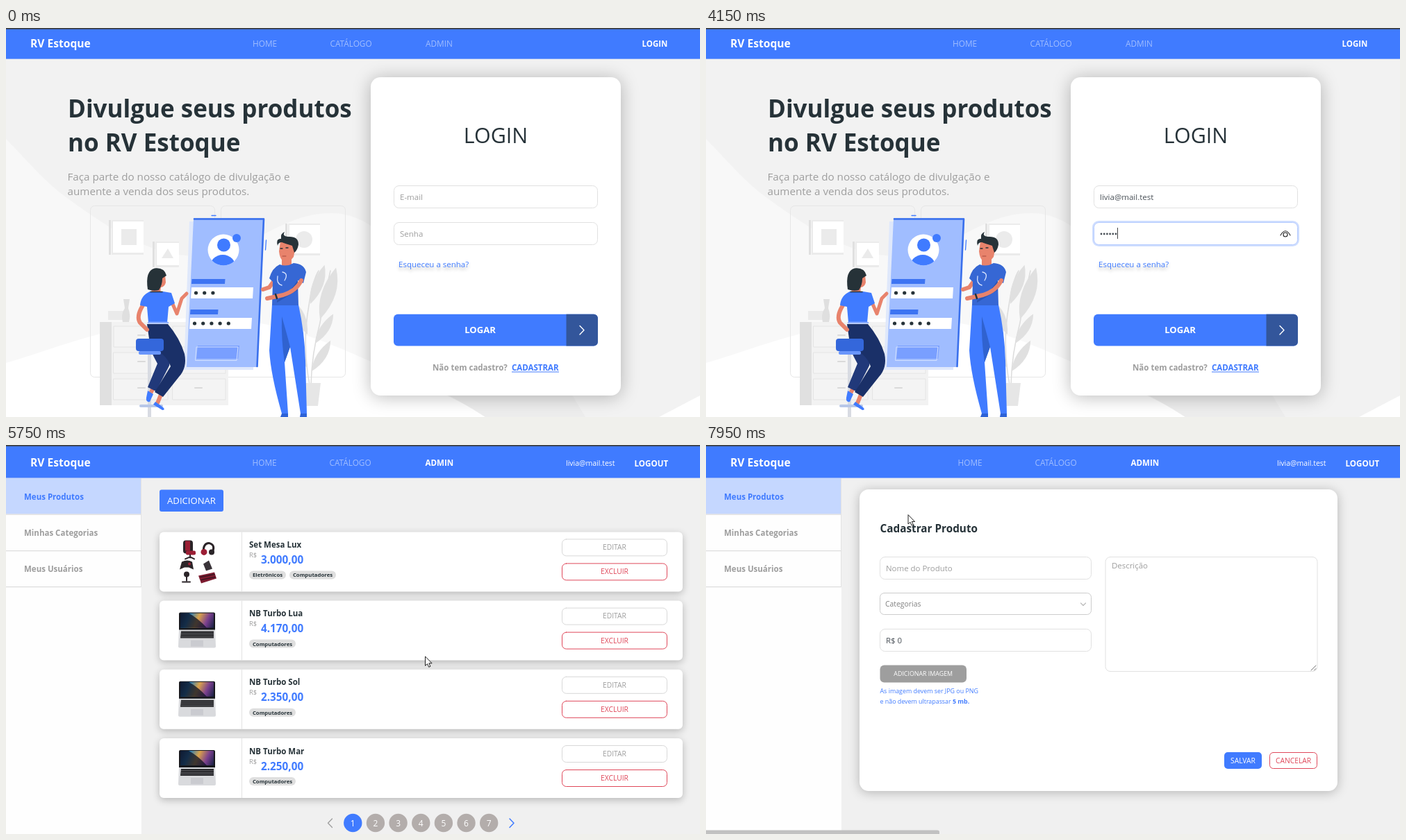
Animation, 999 px wide and 561 px high, one loop 8000 ms. Source, as an HTML page with a canvas:

```html
<!DOCTYPE html>
<html lang="pt-BR">
<head>
<meta charset="utf-8">
<title>Painel de produtos</title>
<style>
html, body { margin: 0; width: 100%; height: 100%; overflow: hidden; background: #f2f2f2; }
canvas { display: block; width: 999px; height: 561px; }
</style>
</head>
<body>
<canvas id="stage" width="999" height="561"></canvas>
<script>
const ctx = document.getElementById('stage').getContext('2d');
const LOOP = 8000;
const BRAND = 'RV Estoque';
const EMAIL = 'livia@mail.test';
const BLUE = '#407bff', INK = '#263238', GRAY = '#9e9e9e', RED = '#df4759';
const LINE = '#e1e1e1', BG = '#f2f2f2', SKIN = '#e8836c', NAVY = '#1a3068';

const clamp = v => Math.max(0, Math.min(1, v));
const ramp = (t, from, to) => clamp((t - from) / (to - from));

function text(s, x, y, size, color, weight = 400, align = 'left') {
  ctx.font = `${weight} ${size}px "Open Sans", "Noto Sans", sans-serif`;
  ctx.textAlign = align;
  ctx.fillStyle = color;
  ctx.fillText(s, x, y);
}

function rect(x, y, w, h, color) {
  ctx.fillStyle = color;
  ctx.fillRect(x, y, w, h);
}

function box(x, y, w, h, r, fill, stroke, width = 1) {
  ctx.beginPath();
  ctx.roundRect(x, y, w, h, r);
  if (fill) { ctx.fillStyle = fill; ctx.fill(); }
  if (stroke) { ctx.strokeStyle = stroke; ctx.lineWidth = width; ctx.stroke(); }
}

function shape(d, fill, stroke, width = 1) {
  const p = new Path2D(d);
  if (fill) { ctx.fillStyle = fill; ctx.fill(p); }
  if (stroke) {
    ctx.strokeStyle = stroke;
    ctx.lineWidth = width;
    ctx.lineCap = ctx.lineJoin = 'round';
    ctx.stroke(p);
  }
}

function dot(x, y, r, color) {
  ctx.beginPath();
  ctx.arc(x, y, r, 0, Math.PI * 2);
  ctx.fillStyle = color;
  ctx.fill();
}

function shadowed(blur, dy, color, draw) {
  ctx.save();
  ctx.shadowBlur = blur;
  ctx.shadowOffsetY = dy;
  ctx.shadowColor = color;
  draw();
  ctx.restore();
}

function at(x, y, draw) {
  ctx.save();
  ctx.translate(x, y);
  draw();
  ctx.restore();
}

/* ---------- login page ---------- */

function backdrop() {
  rect(0, 0, 999, 561, BG);
  shape('M0 160C30 190 55 222 92 248C170 305 245 350 330 318C385 292 420 266 470 267C500 268 518 280 535 292V561H0Z', '#f8f8f8');
  shape('M0 483C60 466 130 436 230 421C330 410 410 430 500 470C580 505 640 528 690 561H0Z', '#fff');
  shape('M690 561C640 528 600 510 560 496L800 505L834 561Z', '#ededed');
  shape('M940 561L999 530V561Z', '#fff');
}

function wallFrame(x, y, w, h) {
  rect(x, y, 3, h, '#e0e0e0');
  rect(x + 4, y, w, h, '#ebebeb');
  rect(x + 6, y + 2, w - 2, h - 5, '#fff');
}

function leaf(x, y, angle, len) {
  at(x, y, () => {
    ctx.rotate(angle);
    ctx.beginPath();
    ctx.moveTo(0, 0);
    ctx.quadraticCurveTo(len * 0.27, -len * 0.55, 0, -len);
    ctx.quadraticCurveTo(-len * 0.23, -len * 0.45, 0, 0);
    ctx.fillStyle = '#e0e0e0';
    ctx.fill();
  });
}

function room() {
  for (const x of [122, 310]) box(x - 0.5, 256.5, 179, 247, 6, null, '#e6e6e6');
  wallFrame(148, 277, 46, 50);
  rect(166, 290, 22, 23, '#ebebeb');
  wallFrame(211, 308, 34, 37);
  shape('M224 332L233 318L241 332Z', '#ebebeb');
  wallFrame(402, 282, 46, 46);
  dot(429, 305, 12, '#ebebeb');

  rect(135, 424, 17, 120, '#e0e0e0');
  rect(152, 424, 168, 120, '#f2f2f2');
  for (let i = 0; i < 3; i++) {
    const y = 430 + i * 38;
    box(155, y, 78, 30, 0, '#f4f4f4', '#e4e4e4');
    box(240, y, 76, 30, 0, '#f4f4f4', '#e4e4e4');
    shape(`M190 ${y + 13}h10M272 ${y + 13}h10`, null, '#dadada', 2);
  }
  rect(147, 408, 25, 13, '#eaeaea');
  shape('M169 391H178L176 404Q180 415 177 424H168Q165 413 171 404Z', '#dfdfdf');

  shape('M437 515Q426 455 436 400Q441 365 450 350M439 515Q440 470 452 425Q457 395 467 350', null, '#dcdcdc', 1.5);
  leaf(438, 398, 0.35, 60);
  leaf(452, 420, 0.3, 78);
  leaf(434, 442, -0.4, 52);
  leaf(445, 455, 0.55, 50);
  leaf(434, 490, -0.55, 44);
  leaf(440, 495, 0.55, 52);
  shape('M421 512H453L449 545H427Z', '#e6e6e6');
}

function panel() {
  shape('M264 279L366 279L356 493L256 493Z', '#dfe8fb');
  shape('M270 274H372L362 489H260Z', '#a0bdff');
  shape('M271 275.5H371L361.5 488', null, '#3a70ec', 2.6);
  shape('M296 270.5H302M374.5 306L373.5 320', null, BLUE, 1.3);
  dot(313, 320, 22.5, '#fff');
  ctx.save();
  ctx.beginPath();
  ctx.arc(313, 320, 22.5, 0, Math.PI * 2);
  ctx.clip();
  dot(312, 346, 19, BLUE);
  ctx.restore();
  dot(313.5, 313, 9.5, BLUE);
  dot(332, 303, 6, BLUE);

  const field = (y, x, barWidth, count) => {
    shape(`M${x + 1.5} ${y - 12}h${barWidth}l-.5 7h${-barWidth}Z`, '#3d74f2');
    shape(`M${x + 1} ${y}h89l-1 16h-89Z`, '#fff');
    for (let i = 0; i < count; i++) dot(x + 7.5 + i * 12.2, y + 8, 2.6, INK);
  };
  field(374, 266, 48, 3);
  field(418, 264, 40, 5);
  shape('M276 458H336L334 477H274Z', '#799fff');
  shape('M274.5 460H334L332 479.5H273Z', null, '#d3e1ff', 1);
}

function woman() {
  // stool
  rect(204, 470, 5, 91, '#d8dbe2');
  shape('M194 545H224', null, '#b8c7e8', 4);
  // legs
  shape('M224 526L218 541M213 517L208 527', null, SKIN, 6);
  shape('M221 455Q239 470 235 487L216 524L204 518L218 484Q208 466 205 455Z', '#21397a');
  shape('M203 427H233Q250 447 257 470Q261 490 249 503L226 532L214 525L237 488Q230 468 208 462Z', NAVY);
  shape('M215 539L226 547Q230 551 225 551L212 543ZM204 523L212 528L207 539Q201 540 202 533Z', BLUE);
  box(187, 448, 40, 18, 4, '#3467db');
  box(191, 466, 32, 5, 2, '#6a96fb');
  // arms
  shape('M197 400Q187 416 193 425L203 435', null, SKIN, 6);
  shape('M239 396L246 412L253 390L260 383', null, SKIN, 5);
  shape('M210 372H223L222 386H209Z', SKIN);
  shape('M207 380H226L238 382L243 397L234 402L232 425H205L203 402L193 400Q194 386 207 380Z', BLUE);
  shape('M208 380.5H225', null, INK, 1.5);
  shape('M205 425H233', null, '#8eafff', 2.5);
  // head
  shape('M220 353L229 356L230 367Q228 375 220 374Z', SKIN);
  shape('M204 377Q200 350 214 346.5Q228 345 231 357L225 361Q225 371 220 378Q212 380 204 377Z', INK);
}

function man() {
  // trousers and shoes
  shape('M383 399H421Q430 440 431 480L433 556H424L409 460L401 482L406 556H397Q381 500 379 465Z', BLUE);
  shape('M397 416Q404 440 409 460L401 482Q396 450 397 416Z', '#3062cf');
  shape('M397 556H406V561H395ZM424 556H433V561H423Z', '#2e62d6');
  // arms and shirt
  shape('M389 360L379 374L370 377', null, SKIN, 6);
  shape('M397 330H411V346H397Z', SKIN);
  shape('M394 341Q404 345 414 339Q429 340 432 352L428 368L420 364L421 400H383L384 366L379 361Q383 346 394 341Z', '#3667d4');
  shape('M420 364L407 381L390 393V396L420 378Z', '#2b56b4');
  shape('M425 364Q418 379 399 385L376 390', null, SKIN, 6);
  shape('M391 358Q389 369 397 371M398 352Q407 354 401 364', null, '#dce7ff', 1.3);
  shape('M388 384L390 390', null, INK, 2.5);
  // head
  shape('M395 308Q411 304 417 314L414 330Q407 340 399 336Q394 333 393 322Z', SKIN);
  shape('M391 314Q388 303 396 304Q395 296 401 294Q397 300 406 301Q421 300 421 312Q420 320 415 324L412 314Q402 311 397 309Q392 309 391 314Z', INK);
  shape('M395 318h3M403 317h3', null, INK, 1.3);
  shape('M398 329L403 329', null, '#a8483c', 1);
}

function inputBox(x, y, w, h, focus = 0) {
  if (focus) box(x - 0.5, y - 0.5, w + 1, h + 1, 8, null, `rgba(64,123,255,${0.25 * focus})`, 3);
  box(x + 0.5, y + 0.5, w - 1, h - 1, 7, '#fff', focus > 0.5 ? '#b4caff' : LINE);
}

function eye() {
  shape('M827 299Q834 286.5 841 299', null, '#222', 1.1);
  ctx.beginPath();
  ctx.arc(834, 298, 3, 0, Math.PI * 2);
  ctx.fillStyle = '#fff';
  ctx.fill();
  ctx.stroke();
}

function loginForm(t) {
  shadowed(26, 2, 'rgba(0,0,0,.27)', () => box(525, 71, 360, 459, 14, '#fff'));
  text('LOGIN', 705, 166, 30.4, INK, 400, 'center');

  const mailFocus = ramp(t, 1250, 1400) * (1 - ramp(t, 2350, 2500));
  const passFocus = ramp(t, 2350, 2500) * (1 - ramp(t, 4800, 4950));
  inputBox(558, 227, 294, 33, mailFocus);
  inputBox(558, 280, 294, 33, passFocus);

  const filled = t >= 2200;
  text(filled ? EMAIL : 'E-mail', 567, 248, 11.5, filled ? '#495057' : GRAY);
  if (t >= 1300 && t < 1650) rect(567, 236, 1, 16, '#444');

  const typed = [2750, 3000, 3200, 3400, 3550, 3750].filter(k => t >= k).length;
  if (typed) {
    for (let i = 0; i < typed; i++) dot(569 + i * 4.2, 297, 1.4, '#495057');
    eye();
  } else {
    text('Senha', 567, 301, 11.5, GRAY);
  }
  if (t >= 2500 && t < 4800) rect(567 + Math.round(typed * 4.2), 288, 1, 16, '#444');

  shadowed(4, 4, 'rgba(0,0,0,.25)', () => text('Esqueceu a senha?', 565, 345, 11.5, BLUE));

  const pressed = t >= 5000 && t < 5200;
  box(558, 412.8, 294, 45.6, 6, pressed ? '#0f58ff' : t >= 4750 ? '#1a60ff' : BLUE);
  box(806.5, 412.8, 45.5, 45.6, [0, 6, 6, 0], '#33569b');
  text('LOGAR', 682.5, 440, 13.1, '#fff', 700, 'center');
  shape('M826 429.5L832 435.7L826 442', null, '#fff', 1.4);

  text('Não tem cadastro?', 614, 494, 11.5, GRAY, 700);
  text('CADASTRAR', 728, 494, 11.5, BLUE, 700);
  rect(728, 495.5, 68, 1, BLUE);
}

function loginPage(t) {
  backdrop();
  rect(0, 0, 999, 44.6, BLUE);
  const faded = 'rgba(255,255,255,.5)';
  text(BRAND, 35, 27.5, 15.6, '#fff', 700);
  text('HOME', 355, 26.5, 11.8, faded);
  text('CATÁLOGO', 466.5, 26.5, 11.8, faded);
  text('ADMIN', 604, 26.5, 11.8, faded);
  text('LOGIN', 915.5, 26.5, 11.5, '#fff', 700);

  text('Divulgue seus produtos', 89, 129, 35, INK, 700);
  text('no ' + BRAND, 89, 177.5, 35, INK, 700);
  text('Faça parte do nosso catálogo de divulgação e', 88.5, 220, 15.2, GRAY);
  text('aumente a venda dos seus produtos.', 88.5, 241, 15.2, GRAY);

  room();
  panel();
  woman();
  man();
  loginForm(t);
}

/* ---------- admin pages ---------- */

function adminFrame(loaded, scrollbar) {
  rect(0, 0, 999, 561, loaded ? '#f0f0f0' : BG);
  const half = scrollbar ? 8 : 0;
  rect(0, 0, 999, 47.5, BLUE);
  text(BRAND, 35, 31, 15.6, '#fff', 700);
  text('HOME', 362.5 - half, 30, 11.8, 'rgba(255,255,255,.5)');
  text('CATÁLOGO', 473.5 - half, 30, 11.8, 'rgba(255,255,255,.5)');
  text('ADMIN', 611.5 - half, 30, 11.6, '#fff', 700);
  text(EMAIL, 822 - half * 2, 30, 10.5, '#fff');
  text('LOGOUT', 920.5 - half * 2, 30.5, 11.6, '#fff', 700);

  if (loaded) rect(0, 48, 195, 513, '#fefefe');
  rect(0, 48, 194, 51.5, '#c5d7ff');
  if (loaded) {
    for (const y of [99.5, 152, 204]) rect(0, y, 195, 1.2, '#dcdcdc');
    rect(194, 48, 1, 157, '#e2e2e2');
  }
  text('Meus Produtos', 26, 79, 11.5, BLUE, 700);
  text('Minhas Categorias', 26, 131, 11.5, GRAY, 700);
  text('Meus Usuários', 26, 183, 11.5, GRAY, 700);
}

function addButton(t) {
  const pressed = t >= 7450;
  if (pressed) box(219.5, 63.5, 95, 34, 4, '#b4cbff');
  box(221, 64.5, 92, 31.5, 3, pressed ? '#0f58ff' : t >= 6900 ? '#1a60ff' : BLUE);
  text('ADICIONAR', 267, 85, 13.1, '#fff', 400, 'center');
}

function laptop() {
  box(249, 17, 52, 29, 2, '#17181d');
  const g = ctx.createLinearGradient(251, 18, 299, 40);
  ['#18325e', '#2a7fb8', '#d9a24a', '#7a3f8f', '#12203f'].forEach((c, i) => g.addColorStop(i / 4, c));
  rect(251, 18, 48, 21, g);
  shape('M251 18H263Q276 25 289 39H251Z', 'rgba(12,18,35,.75)');
  shape('M249 42H301L302 66Q302 68 300 68H250Q248 68 248 66Z', '#d9dadd');
  shape('M252 44H299V54H251Z', '#2a2a2d');
  for (let y = 46.5; y < 54; y += 2.5) rect(252, y, 47, 0.5, '#77787c');
  rect(266, 57, 18, 9, '#cacbd0');
}

function gadgets() {
  const dark = '#2b2428', wine = '#9c1f35';
  // chair
  box(255, 12, 14, 19, 4, dark);
  rect(258, 13, 7, 14, wine);
  box(259, 27, 14, 6, 2, wine);
  shape('M265 33V37M258 39L265 36L271 39', null, dark, 2);
  // headset
  shape('M284 29Q284 16 292 16Q301 18 298 27', null, dark, 3);
  dot(285, 29, 4.5, wine);
  dot(296, 29, 4, dark);
  // gamepad, mouse, microphone, keyboard
  shape('M253 43Q261 39 268 43L270 54L263 51H257L250 54Z', dark);
  dot(264, 46, 2, wine);
  shape('M284 46L292 41L297 53L288 56Z', '#3a3439');
  dot(260, 61, 4, dark);
  shape('M260 64V70M254 72H265', null, dark, 2);
  shape('M277 63L300 58L303 67L281 74Z', '#7d1c30');
  shape('M280 65L300 61M281 69L301 65', null, '#3b1520', 1.5);
}

function productCard(y, name, price, tags, picture) {
  shadowed(11, 3, 'rgba(0,0,0,.24)', () => box(221, y, 753, 86, 6, '#fff'));
  rect(339, y, 1, 86, '#e2e2e2');
  at(0, y, picture);
  text(name, 350, y + 22.5, 11.5, INK, 700);
  text('R$', 350, y + 36.5, 9.4, GRAY);
  text(price, 367, y + 45.5, 15.3, BLUE, 700);
  let x = 350;
  for (const [tag, w] of tags) {
    box(x, y + 56, w, 12, 6, '#dfdfdf');
    text(tag, x + w / 2, y + 65, 7.8, INK, 700, 'center');
    x += w + 5;
  }
  box(800.5, y + 10.5, 151, 24, 6, '#fff', '#d8d8d8');
  text('EDITAR', 876, y + 25.7, 10.3, GRAY, 400, 'center');
  box(800.5, y + 45.5, 151, 24, 6, '#fff', RED);
  text('EXCLUIR', 876, y + 61, 10.3, RED, 400, 'center');
}

function productList() {
  const pc = ['Computadores', 67];
  const rows = [
    ['Set Mesa Lux', '3.000,00', [['Eletrônicos', 53], pc], gadgets],
    ['NB Turbo Lua', '4.170,00', [pc], laptop],
    ['NB Turbo Sol', '2.350,00', [pc], laptop],
    ['NB Turbo Mar', '2.250,00', [pc], laptop]
  ];
  rows.forEach((row, i) => productCard(125.4 + i * 99.2, ...row));
  shape('M469.5 539L463.5 545.3L469.5 551.5', null, GRAY, 1.3);
  shape('M725 539L731 545.3L725 551.5', null, BLUE, 1.5);
  for (let i = 0; i < 7; i++) {
    const x = 499.3 + i * 32.65;
    dot(x, 545, 13.2, i ? '#b3adab' : BLUE);
    text(i + 1, x, 549.5, 12, '#fff', 400, 'center');
  }
}

function productForm() {
  shadowed(16, 2, 'rgba(0,0,0,.25)', () => box(221, 64, 688, 435, 13, '#fff'));
  text('Cadastrar Produto', 250.5, 126, 15.3, INK, 700);
  inputBox(250, 161, 305, 33);
  text('Nome do Produto', 259, 182, 11.45, GRAY);
  box(250.5, 213.5, 304, 31, 6, '#fff', '#cccccc');
  text('Categorias', 258, 233, 10.4, '#808080');
  shape('M539.5 228L543 231.5L546.5 228', null, '#bdbdbd', 1.3);
  inputBox(250, 265, 305, 33);
  text('R$ 0', 259, 286, 11.45, '#495057');
  inputBox(574.5, 161, 306, 166);
  text('Descrição', 584, 178, 11.45, GRAY);
  shape('M871 325L878 318M875.5 325L878 322.5', null, '#777');
  box(250.5, 317.5, 124.5, 25, 6, GRAY);
  text('ADICIONAR IMAGEM', 312.7, 333, 8.85, '#fff', 400, 'center');
  text('As imagem devem ser JPG ou PNG', 250.5, 358, 8.9, BLUE);
  const start = 'e não devem ultrapassar ';
  text(start, 250.5, 373, 8.9, BLUE);
  text('5 mb.', 250.5 + ctx.measureText(start).width, 373, 8.9, BLUE, 700);
  box(746, 443, 54, 24, 5, BLUE);
  text('SALVAR', 773, 458.5, 10.3, '#fff', 400, 'center');
  box(811.5, 443.5, 68, 23, 5, '#fff', RED);
  text('CANCELAR', 845.5, 458.5, 10.3, RED, 400, 'center');
}

function adminPage(t) {
  const form = t >= 7550;
  const loaded = t >= 5700;
  adminFrame(loaded, loaded && !form);
  if (form) {
    productForm();
  } else {
    addButton(t);
    if (loaded) productList();
  }
  if (t >= 7450) box(0, 555.5, 336, 6, [0, 3, 0, 0], '#c1c1c1');
}

/* ---------- pointer ---------- */

const arrow = () => shape('M0 0V13L3 10.3L5.2 15L7.4 14L5.3 9.5H9.2Z', '#fff', '#222', 1);
const hand = () => shape('M-1.5 1Q0-1 1.5 1V6L7 7.5Q8 8 7.5 11L6 16H-1L-5.5 10Q-5 8-3.5 9L-1.5 11Z', '#fff', '#222', 1);

// Each track: pointer drawing, visible until, then [time, x, y] stops.
const tracks = [
  [arrow, 1200, [[100, 430, 0], [500, 505, 150], [900, 538, 330], [1200, 600, 250]]],
  [arrow, 2150, [[1850, 598, 240], [2000, 598, 272]]],
  [arrow, 4750, [[4200, 625, 300], [4750, 640, 418]]],
  [hand, 5300, [[4750, 640, 418], [4950, 642, 428]]],
  [arrow, 6900, [[5300, 641, 428], [5500, 640, 373], [6100, 543, 193], [6200, 543, 193], [6900, 266, 82]]],
  [hand, 7550, [[6900, 266, 82], [7100, 264, 76]]],
  [arrow, LOOP, [[7550, 264, 76], [7700, 264, 76], [7950, 291, 101]]]
];

function pointer(t) {
  const track = tracks.find(([, end, stops]) => t >= stops[0][0] && t < end);
  if (!track) return;
  const [draw, , stops] = track;
  let [, x, y] = stops[0];
  for (let i = 1; i < stops.length; i++) {
    const [t0, x0, y0] = stops[i - 1];
    const [t1, x1, y1] = stops[i];
    if (t < t0) break;
    const k = ramp(t, t0, t1);
    const e = k * k * (3 - 2 * k);
    x = x0 + (x1 - x0) * e;
    y = y0 + (y1 - y0) * e;
  }
  at(x, y, draw);
}

let start;
function frame(now) {
  start ??= now;
  const t = (now - start) % LOOP;
  if (t < 5300) loginPage(t);
  else adminPage(t);
  rect(0, 0, 999, 1.8, '#3c4043');
  pointer(t);
  requestAnimationFrame(frame);
}
requestAnimationFrame(frame);
</script>
</body>
</html>
```
